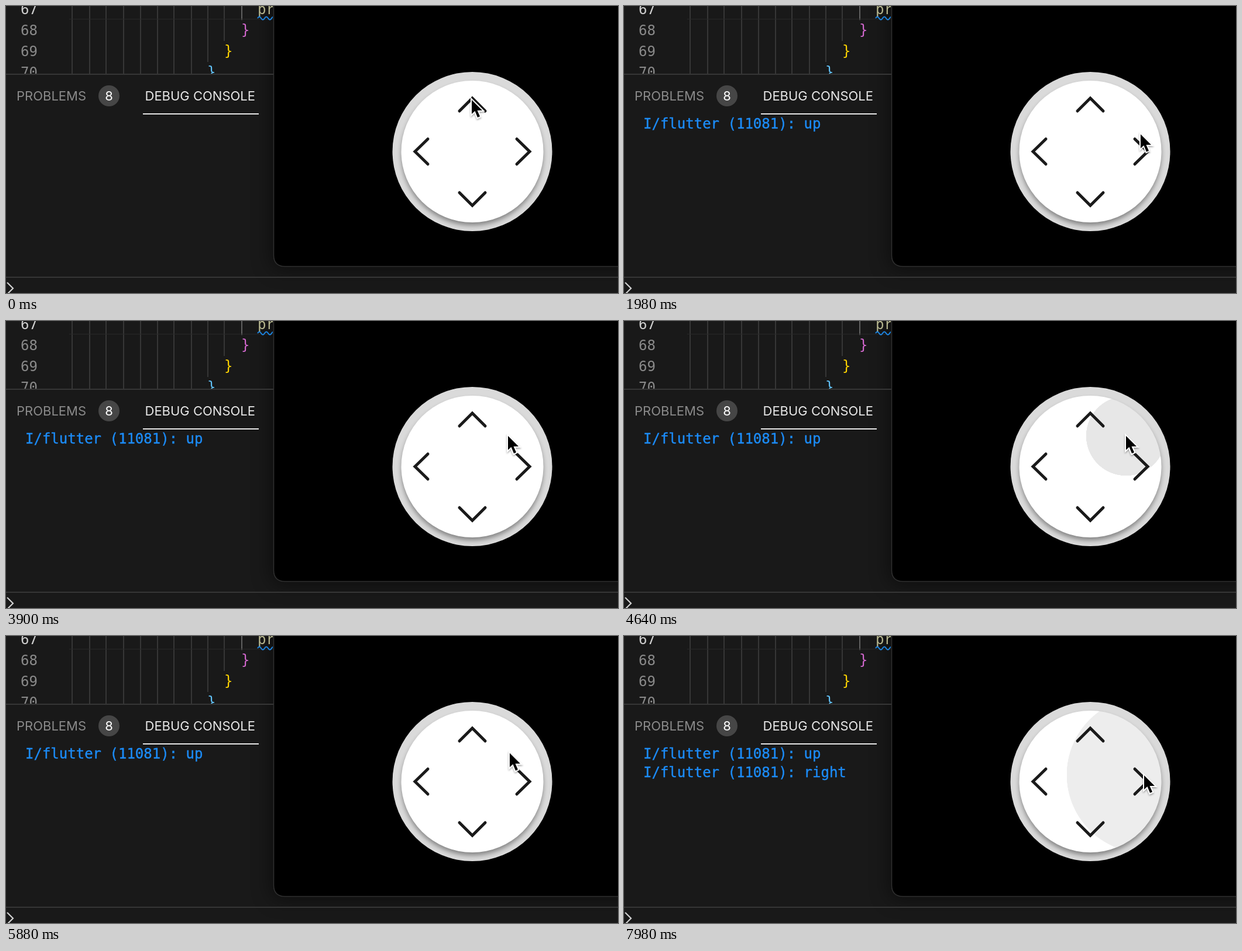
An HTML page for the animation above (8 s loop, 1046x492 px).

```html
<!DOCTYPE html>
<html lang="en">
<head>
<meta charset="utf-8">
<title>Direction pad</title>
<style>
html, body { margin: 0; width: 100%; height: 100%; overflow: hidden; background: #191919; }
svg { display: block; width: 1046px; height: 492px; }
text { white-space: pre; }
.mono { font: 24px "DejaVu Sans Mono", monospace; }
.ui { font: 22px Inter, sans-serif; }
.dim { fill: #8a8a8a; }
.log { fill: #1c8cf8; stroke: #1c8cf8; stroke-width: .4; }
.guides { stroke: #363636; stroke-width: 2; fill: none; }
.arrows { stroke: #1a1a1a; stroke-width: 5; stroke-linecap: round; fill: none; }

.anim { animation: 8s linear infinite; }
.up { animation-name: show-up; }
.right { animation-name: show-right; }
.cursor { animation-name: travel; }
.splash { opacity: 0; animation: grow 8s linear infinite, fade 8s linear infinite; animation-delay: var(--tap); }

/* A splash grows for 740 ms and fades over 1000 ms from the tap. */
@keyframes grow {
  0% { transform: scale(0); }
  9.25%, 100% { transform: scale(1); }
}
@keyframes fade {
  0% { opacity: .122; }
  12.5%, 100% { opacity: 0; }
}
@keyframes show-up {
  0%, 1.12% { opacity: 0; }
  1.125%, 100% { opacity: 1; }
}
@keyframes show-right {
  0%, 94.84% { opacity: 0; }
  94.85%, 100% { opacity: 1; }
}
@keyframes travel {
  0%, 11% { transform: translate(796px, 160px); animation-timing-function: ease-in-out; }
  17.75%, 19.5% { transform: translate(904px, 236px); animation-timing-function: ease-in; }
  24.75% { transform: translate(883px, 219px); animation-timing-function: ease-out; }
  29.5%, 71.5% { transform: translate(858px, 196px); animation-timing-function: ease-in-out; }
  80.75%, 90% { transform: translate(888px, 234px); animation-timing-function: ease-in-out; }
  94.5%, 100% { transform: translate(889px, 238px); }
}
</style>
</head>
<body>
<svg viewBox="0 0 1046 492">
  <defs>
    <clipPath id="code"><path d="M0 0H456V116H0Z"/></clipPath>
    <clipPath id="rim"><circle cx="797" cy="249.5" r="136.5"/></clipPath>
    <clipPath id="disc"><circle cx="797" cy="249.5" r="121.5"/></clipPath>
    <filter id="blur" x="-20%" y="-20%" width="140%" height="140%"><feGaussianBlur stdDeviation="4.5"/></filter>
    <filter id="glow" x="-20%" y="-20%" width="140%" height="140%"><feGaussianBlur stdDeviation="18"/></filter>
    <filter id="shade" x="-50%" y="-50%" width="200%" height="200%">
      <feDropShadow dx="0" dy="2" stdDeviation="1.5" flood-color="#000" flood-opacity=".35"/>
    </filter>
  </defs>

  <rect width="1046" height="492" fill="#191919"/>
  <path d="M457 -60V447H1106V-60Z" opacity=".6" filter="url(#glow)"/>

  <!-- Editor -->
  <g clip-path="url(#code)">
    <path class="guides" d="M113 0V116M143 0V116M171 0V116M201 0V116M230 0V116M259 0V116M287 0V116M317 0V116M345 0V96M373 0V60"/>
    <path d="M403 0V24" stroke="#606060" stroke-width="2"/>
    <path d="M108 22.5H456" stroke="#282828"/>
    <g class="mono">
      <text x="25" y="14" fill="#d0d0d0">67</text>
      <g class="dim">
        <text x="25" y="50">68</text>
        <text x="25" y="86">69</text>
        <text x="25" y="122">70</text>
      </g>
      <text x="430" y="14" fill="#b8b890">pr</text>
      <text x="402" y="49" fill="#d468cf">}</text>
      <text x="373" y="85" fill="#ffd500">}</text>
      <text x="344" y="121" fill="#62c4fa">}</text>
    </g>
    <path d="M430 21q3 -5 6 0t6 0t6 0t6 0t6 0" fill="none" stroke="#1c84e0" stroke-width="2"/>
  </g>

  <!-- Console -->
  <path class="guides" d="M0 117H457M0 465H1046"/>
  <g class="ui">
    <text class="dim" x="18" y="162">PROBLEMS</text>
    <circle cx="176" cy="154" r="18" fill="#464646"/>
    <text x="176" y="162" fill="#fff" text-anchor="middle">8</text>
    <text x="237.5" y="162" fill="#e7e7e7">DEBUG CONSOLE</text>
  </g>
  <path d="M234 185H432" stroke="#e7e7e7" stroke-width="2"/>
  <g class="mono log">
    <text class="anim up" x="33" y="210">I/flutter (11081): up</text>
    <text class="anim right" x="33" y="242">I/flutter (11081): right</text>
  </g>
  <path d="M2 474L12 484L2 494" fill="none" stroke="#d0d0d0" stroke-width="2.2"/>

  <!-- Device -->
  <path d="M457.5 -2V427Q457.5 446.5 477 446.5H1048V-2Z" fill="#000" stroke="#303030" stroke-width="1.5"/>
  <circle cx="797" cy="249.5" r="136.5" fill="#dadada"/>
  <g clip-path="url(#rim)">
    <circle cx="797" cy="255" r="121" opacity=".4" filter="url(#blur)"/>
  </g>
  <circle cx="797" cy="249.5" r="121.5" fill="#fff"/>
  <g clip-path="url(#disc)">
    <g transform="translate(796 161)"><circle class="splash" r="242" style="--tap: 90ms"/></g>
    <g transform="translate(858 197)">
      <circle class="splash" r="251" style="--tap: 2400ms"/>
      <circle class="splash" r="251" style="--tap: 4440ms"/>
    </g>
    <!-- The group hides what would carry over into the next loop. -->
    <g class="anim right" transform="translate(891 238)"><circle class="splash" r="253" style="--tap: 7588ms"/></g>
  </g>
  <path class="arrows" d="M775 180L797 158L819 180M775 320L797 342L819 320M721 228L699 249.5L721 271M873 228L895 249.5L873 271"/>

  <g class="anim cursor">
    <path d="M0 1V25L5.5 20L10 31L14 29.3L9.5 19H18Z" stroke="#fff" stroke-width="4" paint-order="stroke" filter="url(#shade)"/>
  </g>
</svg>
</body>
</html>
```
